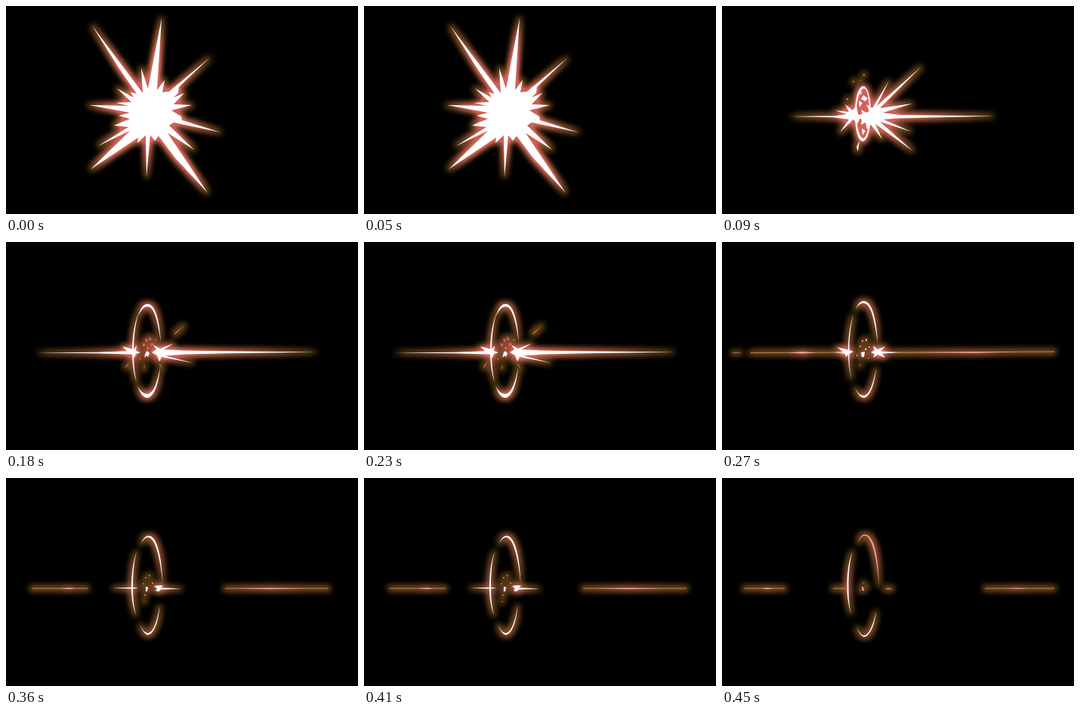
Recreate the animation shown at these times as an HTML page. Size 466 by 275 pixels, loop 540 ms.

```html
<!DOCTYPE html>
<html lang="en">
<head>
<meta charset="utf-8">
<title>Impact flash</title>
<style>
  html, body { margin: 0; width: 100%; height: 100%; overflow: hidden; background: #000; }
  svg { display: block; width: 466px; height: 275px; }
  .pose {
    fill: #fff;
    opacity: 0;
    filter: url(#glow);
    animation: show 540ms step-end calc(var(--i) * 90ms - 540ms) infinite;
  }
  .red { fill: #d9625a; }
  .tan { fill: #b98a48; }
  .pink { fill: #f0a098; }
  @keyframes show {
    0% { opacity: 1; }
    16.6667%, 100% { opacity: 0; }
  }
</style>
</head>
<body>
<svg viewBox="0 0 466 275">
  <defs>
    <!-- wide olive halo from the outline, red bloom from the mass -->
    <filter id="glow" filterUnits="userSpaceOnUse" x="0" y="0" width="466" height="275" color-interpolation-filters="sRGB">
      <feComponentTransfer in="SourceAlpha" result="solid"><feFuncA type="linear" slope="3"/></feComponentTransfer>
      <feMorphology in="solid" operator="dilate" radius="4"/>
      <feGaussianBlur stdDeviation="3.2" result="wide"/>
      <feFlood flood-color="#4a350c" flood-opacity=".9"/>
      <feComposite in2="wide" operator="in" result="olive"/>
      <feGaussianBlur in="SourceAlpha" stdDeviation="4.6"/>
      <feComponentTransfer result="mass"><feFuncA type="linear" slope="2.7"/></feComponentTransfer>
      <feFlood flood-color="#d4645c" flood-opacity=".95"/>
      <feComposite in2="mass" operator="in" result="bloom"/>
      <feMerge>
        <feMergeNode in="olive"/>
        <feMergeNode in="bloom"/>
        <feMergeNode in="SourceGraphic"/>
      </feMerge>
    </filter>
  </defs>

  <!-- burst -->
  <g class="pose" style="--i:0">
    <path d="M114 26L181 115L179 82L188 109L206 16L200 111L210 98L207 114L216 113L270 68L229 107L228 115L222 121L236 115L222 130L246 131L219 138L232 146L233 151L284 167L222 154L216 158L249 190L214 168L267 247L224 201L202 172L197 178L191 171L186 226L185 171L174 181L175 174L112 216L164 165L122 185L162 160L143 158L164 149L149 145L164 141L110 131L162 132L146 128L166 127L147 109L169 121L165 114L173 116L150 83Z"/>
  </g>

  <!-- ring opens, side jets start -->
  <g class="pose" style="--i:1">
    <path class="red" d="M187 110C193 112 196 128 196 142C196 160 192 174 187 176C181 173 179 158 179 142C179 126 181 112 187 110Z" opacity=".6"/>
    <path fill-rule="evenodd" d="M187 106C194 107 197 124 197 142C197 162 193 178 186 179C179 177 176 160 176 142C176 124 180 107 187 106ZM188 109C182 110 178 126 178 142C178 160 182 174 187 175C192 174 195 158 195 142C195 124 193 110 188 109Z"/>
    <path d="M178 146L186 142L184 137L191 141L195 139L191 130L199 135L221 99L205 132L264 80L209 135L252 129L213 141L235 144L361 145.500L232 148.500L214 150L250 166L209 153L253 192L203 156L212 176L197 157L192 163L190 154L184 157L185 150Z"/>
    <path d="M90 146L150 145.200L165 143L150 138L168 140L163 130L173 138L178 131L180 142L183 148L179 156L174 150L156 167L168 150L148 147.300Z"/>
    <path d="M182 178L180 192L178 187ZM187 118L193 122L190 126L184 123ZM181 125L186 128L182 134ZM185 162L190 165L186 171ZM182 115L185 112L184 118Z"/>
    <path class="tan" d="M187 90h2v2h-2ZM173 99h1.500v2h-1.500ZM165 122h2v2h-2ZM183 98h1v1h-1Z"/>
  </g>

  <!-- full ring, longest core jets -->
  <g class="pose" style="--i:2">
    <path d="M175 98C178 86 183 81 188 82C197 83 203 100 205 132C201 104 196 86 188 85.500C182 85 179 90 175 98Z"/>
    <path d="M176 92C170 107 167 125 167 145C167 160 169 174 173 186C170 172 169 160 169 145C169 126 171 108 176 92Z"/>
    <path d="M174 190C178 201 182 206 187 206C196 205 202 188 204 166C200 187 195 200 187 201C182 201 178 197 174 190Z"/>
    <path d="M193 146L199 142L195 136L204 141L222 134L209 142L235 143.500L290 144.300L412 145.500L290 147.300L236 148.500L211 150.500L248 160L206 152L203 158L200 150Z"/>
    <path d="M40 146.500L120 145.700L160 144.300L154 138L169 142L173 137L172 144L178 146L172 148L170 153L166 148.500L120 147.300Z"/>
    <path d="M185 146L187 144L190 147L188 152L186 150L183 153Z"/>
    <path class="red" d="M184 128l4 1l-2 4ZM190 125l3 4l-4 1ZM180 134l5 1l-3 4ZM191 134l5 0l-3 5ZM198 128l2 2l-3 1ZM186 138l4 2l-3 3ZM177 153l2 1l-2 3ZM195 154l2 1l-1 2Z"/>
    <path class="tan" d="M223 121L237 109L224 122ZM158 165L164 158L159 166ZM204 161L208 169L203 162ZM182 167L184 162L183 168Z"/>
  </g>

  <!-- jets thin out -->
  <g class="pose" style="--i:3">
    <path d="M177 89C180 81 184 78 188 78C198 79 204 98 206 133C202 102 197 82 188 81C184 80 180 84 177 89Z"/>
    <path d="M174 96C169 110 167 127 167 145C167 160 169 172 172 183C169 170 168.500 159 168.500 145C168.500 127 170 111 174 96Z"/>
    <path d="M176 193C180 202 184 206 188 206C196 205 202 188 204 167C200 188 195 202 188 203C183 203 180 200 176 193Z"/>
    <path d="M148 146L160 144.500L152 139L169 143L174 145L168 148L164 152L163 148ZM197 146L202 143L200 137L206 142L216 138L210 144.500L238 146L212 147.500L216 153L206 149L200 153L202 148Z"/>
    <path d="M184 146l5 -1l-1 7l-3 0ZM190 140l2 2l-3 1Z"/>
    <path class="pink" d="M185 130h2v2h-2ZM190 128h2v3h-2ZM182 137h2v2h-2ZM194 138h2v2h-2ZM178 149h1.500v2h-1.500ZM193 153h2v1h-2Z"/>
    <path class="tan" d="M14 146h10v.8h-10ZM38 146L160 145.500L160 146.600L38 147ZM230 145.600L440 144.600L440 145.400L230 146.800Z"/>
    <path class="pink" d="M86 146.500L106 145L125 146.500L106 147.500ZM260 146L335 145L390 145.500L335 146.800Z"/>
    <path class="tan" d="M182 162h1.500v1.500h-1.500Z"/>
  </g>

  <!-- jets break away -->
  <g class="pose" style="--i:4">
    <path d="M179 87C182 78 186 76 190 76.500C199 78 206 100 207.500 139C204 104 198 81 189 78.500C185 78 182 81 179 87Z"/>
    <path d="M173 97C168 111 166 127 166 145C166 159 168 171 172 181C169 169 168 159 168 145C168 127 169 112 173 97Z"/>
    <path d="M177 194C181 203 185 207.500 188 207.500C196 206 202 190 203.500 169C200 190 195 204 188 205C184 205 181 201 177 194Z"/>
    <path d="M141 145.500L168 144.500L175 145.500L168 146.500ZM196 143L201 142L208 142L205 145L232 146.500L205 147.500L202 150L198 149L200 146ZM185 144h3l-1 6h-2Z"/>
    <path class="tan" d="M184 131h1.500v2h-1.500ZM189 128h1.500v2h-1.500ZM193 138h2v2h-2ZM181 139h1.500v1.500h-1.500ZM183 154h1.500v2h-1.500ZM182 163h1.500v1h-1.500Z"/>
    <path class="tan" d="M34 145.600h74v1h-74ZM290 145.600h137v1h-137Z"/>
    <path class="pink" d="M72 146L84 145.200L92 146L84 147ZM305 146L350 145.400L396 146L350 146.900Z"/>
  </g>

  <!-- fading remains -->
  <g class="pose" style="--i:5">
    <path class="pink" d="M180 86C183 76 187 74 191 75C201 78 207 102 208 143C205 105 199 79 190 76.300C186 76 183 79 180 86Z"/>
    <path d="M172.500 97C167 112 165.500 128 165.500 145C165.500 159 168 170 171 180C168.500 169 167.500 159 167.500 145C167.500 128 168.500 113 172.500 97Z"/>
    <path d="M178 197C181 205 185 210 188.500 210C196 209 202 194 204 177C200 194 195 207 188.500 208.300C184 208 181 203 178 197Z"/>
    <path class="tan" d="M147 145.500h19v1h-19ZM215 146L221 145.500L226 146.500L220 147.500ZM29 145.600h54v.8h-54ZM348 145.600h92v.8h-92Z"/>
    <path class="pink" d="M52 146L60 145.200L68 146L60 147ZM375 146L392 145.500L405 146L392 146.500ZM185 144h2l1 5h-2Z"/>
    <path class="tan" d="M187 138h1v1.500h-1ZM191 143h1v1h-1ZM183 148h1v1h-1Z"/>
  </g>
</svg>
</body>
</html>
```
